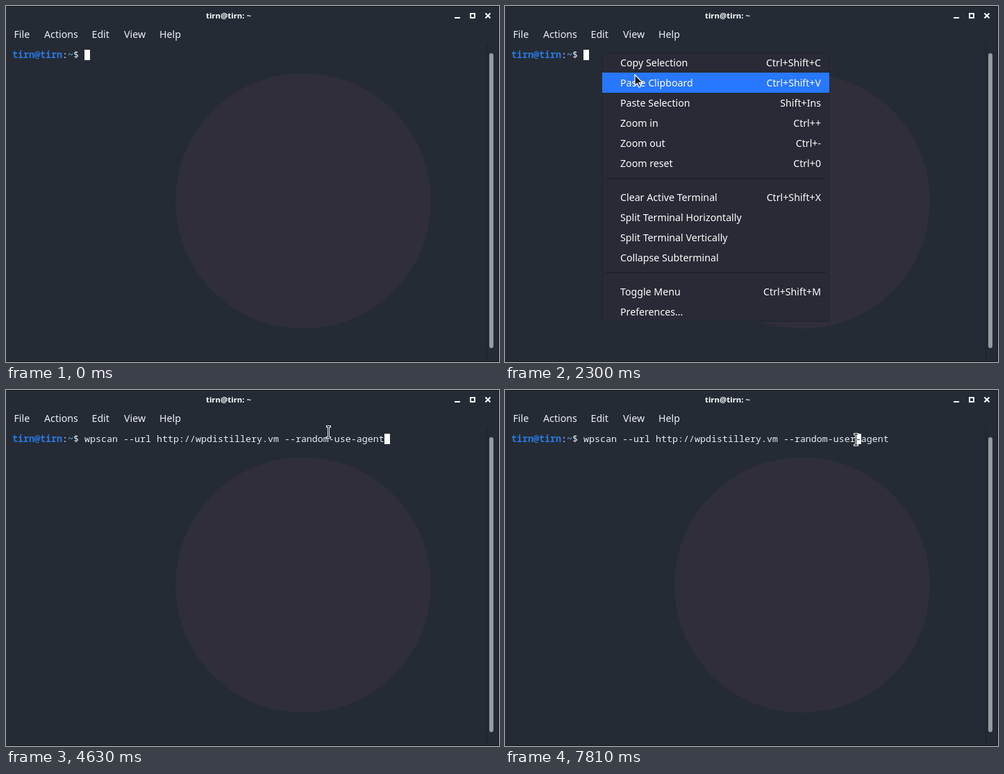
Animation, 710 px wide and 513 px high, one loop 8 s. Source, as an HTML page with a canvas:

```html
<!DOCTYPE html>
<html lang="en">
<head>
<meta charset="utf-8">
<title>Terminal</title>
<style>
html, body { margin: 0; width: 100%; height: 100%; overflow: hidden; background: #242b35; }
canvas { display: block; width: 100vw; height: 100vh; }
</style>
</head>
<body>
<canvas id="stage" width="710" height="513"></canvas>
<script>
const LOOP = 8000;
const ctx = document.getElementById('stage').getContext('2d');
const SANS = '"Noto Sans", "Open Sans", sans-serif';
const MONO = '13.33px "Noto Sans Mono", "DejaVu Sans Mono", monospace';
const UI = '500 14.2px ' + SANS;
const BG = '#242b35';
const CELL = 8, COL0 = 9, CMD_X = 113;
const HOST = 'tirn@tirn';
const TYPED = 'wpscan --url http://wpdistillery.vm --random-use-agent';
const GAP = TYPED.lastIndexOf('-');
const FIXED = TYPED.slice(0, GAP) + 'r' + TYPED.slice(GAP);

const MENU = { x: 140, y: 67, w: 327, h: 388, row: 29 };
const ITEMS = [
  ['Copy Selection', 'Ctrl+Shift+C'], ['Paste Clipboard', 'Ctrl+Shift+V'],
  ['Paste Selection', 'Shift+Ins'], ['Zoom in', 'Ctrl++'],
  ['Zoom out', 'Ctrl+-'], ['Zoom reset', 'Ctrl+0'], null,
  ['Clear Active Terminal', 'Ctrl+Shift+X'], ['Split Terminal Horizontally'],
  ['Split Terminal Vertically'], ['Collapse Subterminal'], null,
  ['Toggle Menu', 'Ctrl+Shift+M'], ['Preferences...']
];

const smooth = u => u * u * (3 - 2 * u);
const linear = u => u;
const slowing = u => 1 - Math.pow(1 - u, 1.64);

// Pointer paths, sampled in a few discrete steps
const MOVES = [
  { t0: 130, t1: 210, n: 2, from: [597, 518], to: [383, 222], ex: linear, ey: linear },
  { t0: 530, t1: 990, n: 7, from: [383, 222], to: [140, 67], ex: smooth, ey: smooth },
  { t0: 2150, t1: 2530, n: 6, from: [140, 67], to: [209, 133], ex: slowing, ey: linear },
  { t0: 4020, t1: 4400, n: 6, from: [209, 133], to: [462, 60], ex: smooth, ey: smooth },
  { t0: 4630, t1: 5170, n: 8, from: [462, 60], to: [505, 71], ex: smooth, ey: smooth }
];
const CARET_LEFT = [5950, 6100, 6250, 6420, 6570, 6720];

function pointerAt(t) {
  const m = MOVES.filter(v => t >= v.t0).pop();
  if (!m) return null;
  const dt = (m.t1 - m.t0) / (m.n - 1);
  // Steps fall on whole hundredths of a second, so allow half of one
  const u = Math.min(m.n, Math.floor((t - m.t0 + 5) / dt) + 1) / m.n;
  const mix = (i, ease) => Math.round(m.from[i] + (m.to[i] - m.from[i]) * ease(u));
  return [mix(0, m.ex), mix(1, m.ey)];
}

function rect(x, y, w, h, color) {
  ctx.fillStyle = color;
  ctx.fillRect(x, y, w, h);
}

function text(s, x, y, font, color, align = 'left') {
  ctx.font = font;
  ctx.fillStyle = color;
  ctx.textAlign = align;
  ctx.fillText(s, x, y);
}

function trace(points, close) {
  ctx.beginPath();
  points.forEach(([x, y]) => ctx.lineTo(x, y));
  if (close) ctx.closePath();
}

function drawWindow() {
  rect(0, 0, 710, 513, BG);
  ctx.fillStyle = '#302e39';
  ctx.beginPath();
  ctx.arc(428, 281, 184, 0, Math.PI * 2);
  ctx.fill();

  rect(0, 0, 710, 1, '#161b22');
  rect(0, 512, 710, 1, '#161b22');
  rect(709, 0, 1, 513, '#161b22');
  text(HOST + ': ~', 320.5, 18, '600 11.4px ' + SANS, '#ffffff', 'center');

  rect(646, 16, 8, 2, '#ffffff');
  ctx.strokeStyle = '#ffffff';
  ctx.lineWidth = 2;
  ctx.strokeRect(669, 11, 6, 6);
  trace([[690.5, 10.5], [697.5, 17.5]]);
  ctx.stroke();
  trace([[697.5, 10.5], [690.5, 17.5]]);
  ctx.stroke();

  [['File', 11.5], ['Actions', 55], ['Edit', 123.5], ['View', 170], ['Help', 221]]
    .forEach(([s, x]) => text(s, x, 46, UI, '#eef0f2'));

  rect(692, 55, 1, 457, '#1a2028');
  ctx.fillStyle = '#969b9f';
  ctx.beginPath();
  ctx.roundRect(696, 68, 6, 425, 3);
  ctx.fill();
}

function drawShell(t) {
  text(HOST, COL0, 75, 'bold ' + MONO, '#2a7ae2');
  const x = COL0 + HOST.length * CELL;
  text(':', x, 75, MONO, '#e8edf0');
  text('~', x + CELL, 75, 'bold ' + MONO, '#5a9bd5');
  text('$', x + 2 * CELL, 75, MONO, '#e8edf0');

  const line = t < 3080 ? '' : t < 7810 ? TYPED : FIXED;
  let caret = line.length;
  if (t >= 7810) caret = GAP + 1;
  else if (line) caret -= CARET_LEFT.filter(k => t >= k).length;
  text(line, CMD_X, 75, MONO, '#e8edf0');
  const cx = CMD_X + caret * CELL;
  rect(cx, 63, CELL, 15, '#ffffff');
  if (caret < line.length) text(line[caret], cx, 75, MONO, BG);
}

function drawMenu(active) {
  const { x, y, w, h, row } = MENU;
  rect(x, y, w, h, '#20242d');
  rect(x + 1, y + 1, w - 2, h - 2, '#282a35');
  let top = y;
  ITEMS.forEach((item, i) => {
    if (!item) {
      rect(x + 5, top + 7, w - 10, 1, '#191c24');
      top += 20;
      return;
    }
    if (i === active) rect(x, top, w, row, '#2777ff');
    text(item[0], 166, top + 20, UI, '#ffffff');
    if (item[1]) text(item[1], 455, top + 20, UI, '#ffffff', 'right');
    top += row;
  });
}

function drawArrow(x, y) {
  trace([[0, 0], [0, 15.5], [3.5, 12.5], [6, 18], [8.5, 17], [6, 11.5], [11, 11.5]]
    .map(([a, b]) => [x + a, y + b - 1]), true);
  ctx.fillStyle = '#15181d';
  ctx.strokeStyle = '#ffffff';
  ctx.lineWidth = 1.2;
  ctx.fill();
  ctx.stroke();
}

function drawBeam(x, y) {
  const cx = x + 0.5, top = y - 7.5, end = y + 8.5;
  [[3, '#e9ecee', 1], [1, '#14181e', 0]].forEach(([width, color, cap]) => {
    ctx.lineWidth = width;
    ctx.strokeStyle = color;
    [[[cx - 2.5 - cap, top], [cx + 2.5 + cap, top]],
     [[cx, top], [cx, end]],
     [[cx - 2.5 - cap, end], [cx + 2.5 + cap, end]]].forEach(p => {
      trace(p);
      ctx.stroke();
    });
  });
}

function draw(t) {
  drawWindow();
  drawShell(t);
  const p = pointerAt(t);
  if (t >= 1770 && t < 3010) {
    drawMenu(t < 2150 ? -1 : Math.floor((p[1] - MENU.y) / MENU.row));
  }
  if (!p) return;
  if (t >= 1840 && t < 3010) drawArrow(...p);
  else drawBeam(...p);
}

const start = performance.now();
function tick() {
  draw((performance.now() - start) % LOOP);
  requestAnimationFrame(tick);
}
tick();
</script>
</body>
</html>
```
